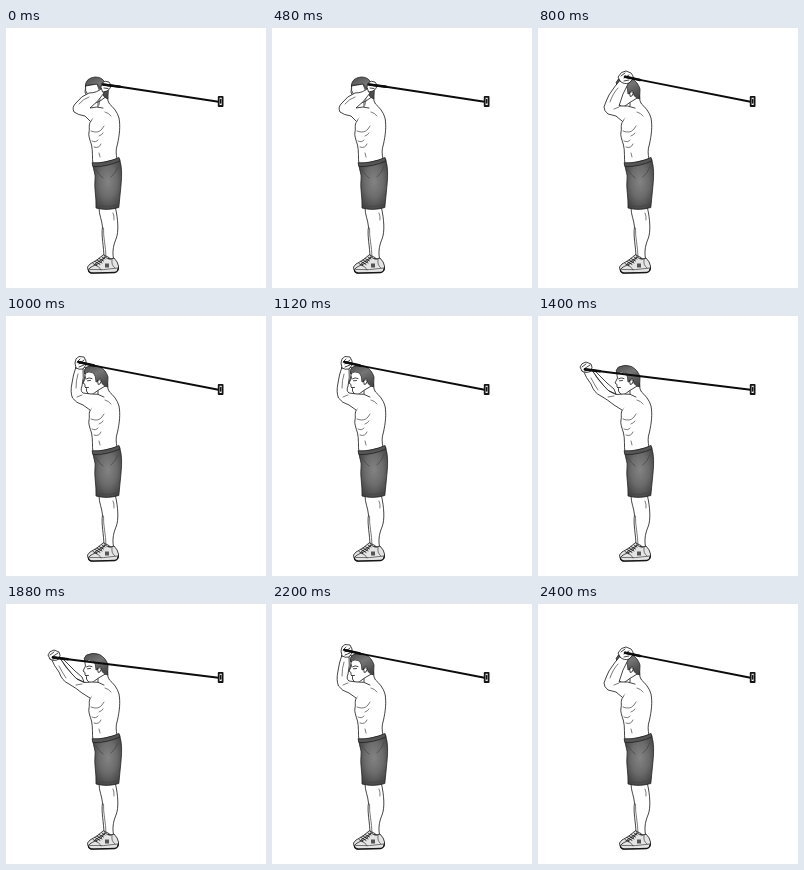
An HTML page that plays this animation: 260 by 260 pixels, repeating every 2.6 s.

```html
<!DOCTYPE html>
<html lang="en">
<head>
<meta charset="utf-8">
<title>Band triceps extension</title>
<style>
  html, body { margin: 0; width: 100%; height: 100%; overflow: hidden; background: #fff; }
  svg { display: block; width: 100vw; height: 100vh; }
  path { fill: none; stroke: #151515; stroke-width: .8; stroke-linecap: round; stroke-linejoin: round; }
  .skin { fill: #fff; }
  .fine { stroke: #333; stroke-width: .65; }
  .hair { fill: url(#hair); stroke: #2a2a2a; }
  .cloth { fill: url(#cloth); stroke: #222; }
  .belt { fill: #555; stroke: #222; }
  .fold { stroke: #444; stroke-width: .7; }
  .shoe { fill: #e4e4e4; }
  .sole { stroke-width: 1.3; }
  .dark { fill: #555; stroke: none; }
  .band { stroke: #0c0c0c; stroke-width: 1.9; }
  .grip { stroke: #0c0c0c; stroke-width: 2.6; }
  .pose { opacity: 0; }
</style>
</head>
<body>
<svg viewBox="0 0 260 260">
  <defs>
    <radialGradient id="cloth" cx=".52" cy=".45" r=".62">
      <stop offset="0" stop-color="#838383"/>
      <stop offset=".5" stop-color="#6c6c6c"/>
      <stop offset="1" stop-color="#404040"/>
    </radialGradient>
    <linearGradient id="hair" x2=".6" y2="1">
      <stop offset="0" stop-color="#4c4c4c"/>
      <stop offset=".5" stop-color="#757575"/>
      <stop offset="1" stop-color="#4a4a4a"/>
    </linearGradient>
  </defs>

  <g id="legs">
    <path class="skin" d="M93 180C93 187 96 192 96.5 199C95 208 98 219 98 230L107.5 231C106 222 108 216 110 211C113 204 112 191 109.5 180Z"/>
    <path class="fine" d="M97.5 200C97 209 100 219 100 229M107 185Q108.5 188 108 192"/>
  </g>
  <g id="shoes">
    <path class="shoe" d="M97 227L91 232L84 236Q80 239 82 242L96 242L103 230Z"/>
    <path class="shoe" d="M99 229L95 234C91 237 85 238 83 241Q81 244.5 86 245L109 244.5Q113 243.5 112.5 238Q112 234 108 230Q104 233 99 229Z"/>
    <path class="sole" d="M82.5 242.5Q83 245 87 245.2L109 244.5Q112 243.5 112.4 240"/>
    <path class="fine" d="M84 241.5Q97 242.5 112 240M90 237Q94 239 95 242M106 232Q105 237 109 240"/>
    <path d="M89 233.5L94 236.5M91 232L96 235M93 230.5L97.5 233M87 235.5L91 238M96 229L99 231M89 236L98 230"/>
    <path class="dark" d="M99 235.5h4v4h-4z"/>
  </g>

  <path class="skin" d="M92 70L92 79L85 93C82 97 84 100 83 104C82 107 84 112 85.5 117C87 123 86 130 87 137L111 131C110 126 109.5 122 111.5 116C113.5 107 114.5 98 113 90C111.5 84 107 79 103.5 76Q101.5 74 101.5 68Z"/>
  <path class="fine" d="M85 103Q92 106 96 101L98 98M93 108Q96 107 97 105M86 113Q90 115 92 112M88 119Q93 121 95 116M93 125L94 129M99 84Q103 85 105 88"/>

  <path class="cloth" d="M87 137Q100 139 113.5 131C116 139 116 147 115 157L112.8 179.5Q101 183 90 180C90.5 169 88 160 89 152C90 146 87 142 87 137Z"/>
  <path class="belt" d="M86.5 134.8Q100 135.5 113 129.5L114 132.8Q101 139 87.3 138.6Z"/>
  <path class="fold" d="M90 142Q94 148 97 150M112 139Q109 146 105 149M90.5 177.5Q101 180 112.5 176.8"/>

  <g id="poses"></g>

  <path d="M212.7 68.8H216.6V78H212.7Z" style="fill:#fff;stroke-width:1.8"/>
  <path d="M214.7 71.6V75" style="stroke-width:1.5"/>
</svg>
<script>
const LOOP = 2600;
const ANCHOR = "212.5 73.8";

const face = [
  ["skin", "M79.5 56Q78.5 60 79.5 62L77 67L79 68.5L79 71L80.5 72.5L80.5 75Q83 80 87 78L92.5 74L101 69L99 56"],
  ["", "M80.5 62.8Q83 61 86 62.5M81.5 64.8L84.5 64.5M80 71.5L82.5 71.5"],
  ["hair", "M78.5 57.5Q77 54 80.5 51Q87 48 93.5 50.5Q100 54 102 61L101.6 71Q98 70 96 67.5L95 63Q92 62 91.5 65.5L90 66Q90 60 87.5 57Q83 54.5 78.5 57.5Z"],
  ["skin", "M92 64.5Q95 62.5 95 65.5Q94.5 69 92.5 68.5Z"]
];

const turned = [
  ["skin", "M80 56L79 64L84 77L94 73L101 68L99 55Z"],
  ["hair", "M79.5 57Q80 50 89 49Q96 49 98.5 54L102.5 60L101.8 71Q98 70 96 65L92 57Z"],
  ["skin", "M79.5 58L91 56L94 64L82 67Q78.5 63 79.5 58Z"]
];

// Each pose: head, far arm, near arm, creases, hand, knuckles, grip start and end
const poses = [
  { head: turned,
    far: "M80 64Q80 60 85 58L95 56L96 62L84 67Z",
    arm: "M97 80Q91 78 84 80Q92 74 98 65L96 60Q91 65 83 65Q75 68 70 75Q65.5 79 68 84Q72 87 79 88L84 93",
    skin: "M73 76Q77 71 83 69M94 71L93 77",
    hand: "M95 59L96 55Q99 52 103 54L105 57Q105 61 101 63L97 64Z",
    fist: "M98 57L103 58M98 60L102 60.5",
    grip: ["97 56.5", "114 58.8"] },
  { head: face,
    far: "M89 53L91 55L87 64L84 66L82 62Z",
    arm: "M97 80Q90 77 81 78Q83 72 85 66L91 54L83 51Q76 59 71 67Q68 73 66 79Q66 83 70 86L78 88L84 93",
    skin: "M72 74Q75 65 80 60M76 81L81 79",
    hand: "M82 53L80 49Q83 43 88 43L93 45Q96 48 95 51L91 55Q86 57 82 53Z",
    fist: "M83 48L87 45M86 50L91 47M86 53L91 52",
    grip: ["87 48.8", "102 51.9"] },
  { head: face,
    far: "M76 51L81 52L79 60L77 67L73 65Z",
    arm: "M98 81Q92 77 85 78L77 77Q74 75 76 70Q78 62 77 52L70 51Q67 59 66 67Q64 76 66.5 82Q70 87 77 89L84 94",
    skin: "M70 72Q70 64 72 58M71 81L76 79",
    hand: "M70 52L69 47Q69 42 73 40.5L78 41Q81 45 80 49L77 53Q73 54 70 52Z",
    fist: "M71 46L74 43M73 48L78 44M73 51L78 49",
    grip: ["72.5 46", "88 49.6"] },
  { head: face,
    far: "M64 50L68.5 53L73 65L77 72L75 77L69 67Z",
    arm: "M98 81Q92 77 85 78L76 78Q71 73 69 66Q66 59 66 51L57 50Q58 59 60 67Q60 76 64 81Q69 87 77 89L84 94",
    skin: "M64 73Q62 65 62 57M69 80L75 78",
    hand: "M57 51L55 47Q56 42 60 40.5L65 42Q67 46 66 50Q62 54 57 51Z",
    fist: "M57 46L60 43M59 48L64 44M60 51L65 49",
    grip: ["59 47", "77 49.9"] },
  { head: face,
    far: "M53 53L58 56L69 67L76 73L78 78L69 74Z",
    arm: "M98 81Q92 77 86 78L78 78.5Q70 76 66 70Q59 63 54 54L45 54Q48 62 53 68Q56 77 63 80Q70 84 76 89L84 94",
    skin: "M60 74Q56 68 53 62M70 81L76 80",
    hand: "M44 55L42 51Q43 47 48 46L53 48Q55 51 53 55Q48 58 44 55Z",
    fist: "M44 51L48 48M46 53L52 49M47 55L52 54",
    grip: ["47 53.4", "62 55.2"] }
];

// [start in ms, pose]
const steps = [[0, 0], [800, 1], [1000, 2], [1200, 3], [1400, 4], [2200, 2], [2400, 1]];

const NS = "http://www.w3.org/2000/svg";
const stage = document.getElementById("poses");

function add(parent, tag, attrs) {
  const el = document.createElementNS(NS, tag);
  for (const key in attrs) el.setAttribute(key, attrs[key]);
  return parent.appendChild(el);
}

poses.forEach((p, i) => {
  const g = add(stage, "g", { class: "pose" });
  const parts = [
    ["skin", p.far], ...p.head, ["skin", p.arm], ["fine", p.skin], ["skin", p.hand],
    ["band", `M${p.grip[0]}L${p.grip[1]}L${ANCHOR}`],
    ["grip", `M${p.grip[0]}L${p.grip[1]}`],
    ["", p.fist]
  ];
  for (const [cls, d] of parts) add(g, "path", { class: cls, d });

  const frames = steps.map(([at, pose]) => ({
    offset: at / LOOP, opacity: pose === i ? 1 : 0, easing: "step-end"
  }));
  frames.push({ offset: 1, opacity: i === 0 ? 1 : 0 });
  g.animate(frames, { duration: LOOP, iterations: Infinity });
});
</script>
</body>
</html>
```
